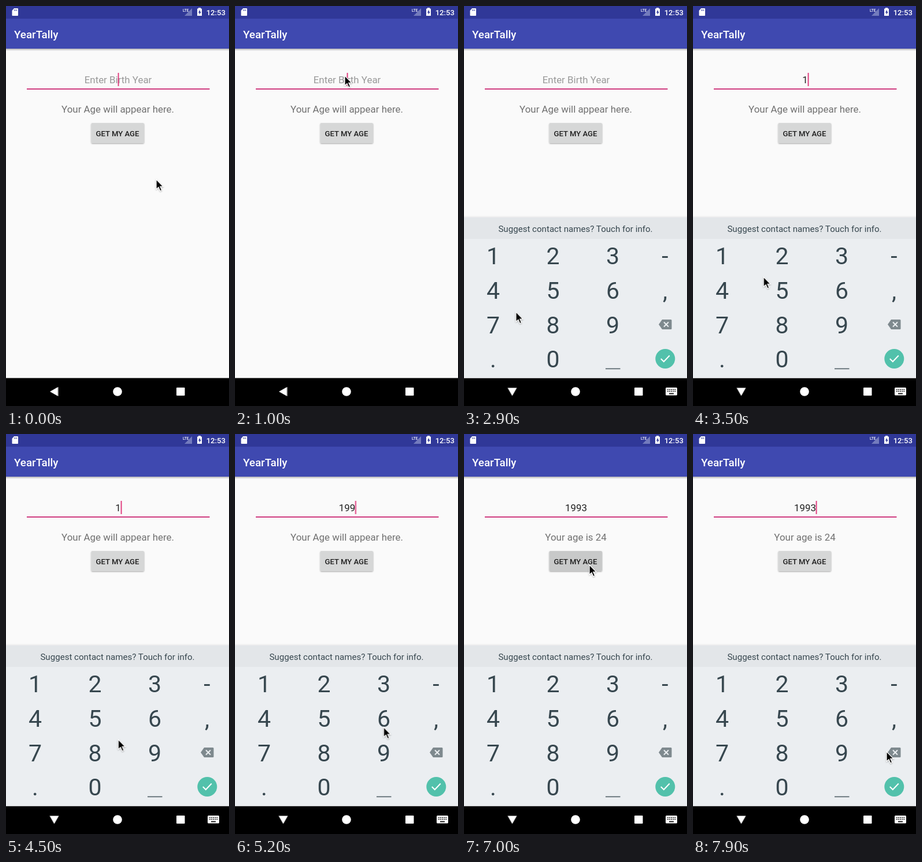
An HTML page that plays this animation: 386x694 px, repeating every 8000 ms.

```html
<!DOCTYPE html>
<html lang="en">
<head>
<meta charset="utf-8">
<title>Age finder</title>
<style>
html, body { margin: 0; width: 100%; height: 100%; overflow: hidden; background: #fafafa; }
svg { display: block; width: 386px; height: 694px; font-family: Roboto, sans-serif; }
.mid { text-anchor: middle; }
.bold { font-weight: 500; }
.body { font-size: 16.9px; }
.digits { font-size: 41px; fill: #37474f; }

#mouse, #board, #back, #ime, #lines, #caret, #caret rect, #ask, #answer, #press {
  animation: 8s linear infinite;
}
#ime, #lines, #caret, #caret rect, #ask, #answer { animation-timing-function: step-end; }
#mouse { animation-name: mouse; }
#board { animation-name: board; }
#back { animation-name: back; }
#ime { animation-name: ime; }
#lines { animation-name: lines; }
#caret { animation-name: caret; }
#caret rect { animation-name: blink; }
#ask { animation-name: ask; }
#answer { animation-name: answer; }
#press { animation-name: press; }

@keyframes mouse {
  0% { transform: translate(260px, 301px); }
  5% { transform: translate(282px, 240px); }
  11.25%, 15% { transform: translate(190px, 121px); }
  20%, 32.5% { transform: translate(206px, 125.5px); }
  36.25% { transform: translate(90px, 531px); }
  40%, 41.25% { transform: translate(57px, 440px); }
  43.75% { transform: translate(122px, 470px); }
  50%, 51.25% { transform: translate(200px, 500px); }
  56.25% { transform: translate(194px, 530px); }
  58.75%, 63.75% { transform: translate(258px, 545px); }
  67.5%, 71.25% { transform: translate(256px, 437px); }
  78.75%, 91.25% { transform: translate(217px, 227px); }
  98.75%, 100% { transform: translate(335px, 551px); }
}
@keyframes board {
  0%, 23.75% { transform: translateY(82px); opacity: 0; }
  27.5% { transform: translateY(27px); opacity: .72; }
  30.6%, 100% { transform: none; opacity: 1; }
}
@keyframes back {
  0%, 23.75% { transform: translate(83.5px, 669px) rotate(0deg); }
  26.25%, 100% { transform: translate(83.5px, 669px) rotate(-90deg); }
}
@keyframes ime { 0% { opacity: 0; } 25%, 100% { opacity: 1; } }
@keyframes lines {
  0% { transform: none; }
  42.5% { transform: translateY(-40px); }
  58.75% { transform: translateY(-80px); }
  61.25% { transform: translateY(-120px); }
  67.5%, 100% { transform: translateY(-160px); }
}
@keyframes caret {
  0% { transform: none; }
  42.5% { transform: translateX(5px); }
  58.75% { transform: translateX(9.5px); }
  61.25% { transform: translateX(14.3px); }
  67.5%, 100% { transform: translateX(19px); }
}
@keyframes blink {
  0%, 12.4%, 23.75%, 37.5%, 56.1%, 81.2%, 93.7%, 100% { opacity: 1; }
  6.25%, 18.75%, 31.25%, 50%, 75%, 87.5% { opacity: 0; }
}
@keyframes ask { 0% { opacity: 1; } 82%, 100% { opacity: 0; } }
@keyframes answer { 0% { opacity: 0; } 82%, 100% { opacity: 1; } }
@keyframes press {
  0%, 82%, 90%, 100% { opacity: 0; }
  83.75%, 87.5% { opacity: .06; }
}
</style>
</head>
<body>
<svg viewBox="0 0 386 694">
  <defs>
    <linearGradient id="fade" x2="0" y2="1">
      <stop stop-opacity=".28"/>
      <stop offset="1" stop-opacity="0"/>
    </linearGradient>
    <clipPath id="field"><rect x="36" y="110" width="317" height="32"/></clipPath>
    <filter id="soft" x="-50%" y="-50%" width="200%" height="200%">
      <feDropShadow dx="0" dy="1" stdDeviation="1" flood-opacity=".35"/>
    </filter>
  </defs>

  <rect width="386" height="694" fill="#fafafa"/>
  <rect y="74" width="386" height="4" fill="url(#fade)"/>
  <rect y="21" width="386" height="53" fill="#3f49b0"/>
  <rect width="386" height="22" fill="#303898"/>
  <text class="bold" x="14" y="55.500" font-size="18.800" fill="#fff">YearTally</text>

  <!-- status icons -->
  <path d="M14 4h6q1 0 1 1v11q0 1-1 1h-8.500q-1 0-1-1V8z" fill="#fff"/>
  <path d="M14.500 6v2.500M16.500 6v2.500M18.500 6v2.500" stroke="#303898" stroke-width=".9"/>
  <path d="M322 4v13h-13z" fill="#737bbd"/>
  <text class="bold" x="306" y="10" font-size="6.500" fill="#fff">LTE</text>
  <path d="M333 4.500V3h4v1.500h2V17h-8V4.500z" fill="#fff"/>
  <path d="M336 6.500l-3.200 5h1.900v3.500l3-5h-1.700z" fill="#303898"/>
  <text class="bold" x="380" y="15.500" text-anchor="end" font-size="13.150" fill="#fff">12:53</text>

  <!-- form -->
  <g clip-path="url(#field)">
    <g id="lines" class="mid body" fill="#212121">
      <text x="194" y="134" fill="#999">Enter Birth Year</text>
      <text x="194" y="174">1</text>
      <text x="194" y="214">19</text>
      <text x="194" y="254">199</text>
      <text x="194" y="294">1993</text>
    </g>
  </g>
  <rect x="36" y="143" width="316.500" height="2" fill="#cf3a7f"/>
  <g id="caret"><rect x="193.600" y="116" width="1.900" height="23" fill="#e0397c"/></g>
  <g class="mid body" fill="#707070">
    <text id="ask" x="193.500" y="184.700">Your Age will appear here.</text>
    <text id="answer" x="193.500" y="184.700">Your age is 24</text>
  </g>
  <rect x="147.500" y="203" width="91.500" height="35" rx="2" fill="#d6d7d7" filter="url(#soft)"/>
  <rect id="press" x="147.500" y="203" width="91.500" height="35" rx="2"/>
  <text class="mid bold" x="193" y="225.600" font-size="13.150" fill="#1f1f1f">GET MY AGE</text>

  <!-- navigation -->
  <rect y="645.500" width="386" height="48.500"/>
  <g fill="#fff">
    <path id="back" d="M-7.500 0L6.500-8V8z"/>
    <circle cx="193" cy="669" r="7.800"/>
    <rect x="295" y="662" width="14.500" height="14" rx="1"/>
    <g id="ime">
      <rect x="349" y="662" width="20" height="13.500" rx="1.500"/>
      <path d="M352 665.500h14.500M352 668.500h14.500" stroke="#000" stroke-width="1.700" stroke-dasharray="1.800 1.300"/>
      <path d="M355 672.500h8" stroke="#000" stroke-width="1.700"/>
    </g>
  </g>

  <!-- keyboard, sliding in over the navigation bar -->
  <g id="board">
    <rect y="364.500" width="386" height="3" fill="#000" opacity=".04"/>
    <rect y="366.500" width="386" height="38" fill="#e3e6e9"/>
    <rect y="404" width="386" height="241.500" fill="#ebeef1"/>
    <text class="mid" x="193" y="392" font-size="15.100" fill="#37474f">Suggest contact names? Touch for info.</text>
    <g class="mid digits">
      <text x="50.500" y="448.400">1</text><text x="154" y="448.400">2</text><text x="257.500" y="448.400">3</text><text x="348" y="448.400">-</text>
      <text x="50.500" y="508">4</text><text x="154" y="508">5</text><text x="257.500" y="508">6</text><text x="348" y="508">,</text>
      <text x="50.500" y="567.500">7</text><text x="154" y="567.500">8</text><text x="257.500" y="567.500">9</text>
      <text x="50.500" y="627">.</text><text x="154" y="627">0</text>
    </g>
    <rect x="245" y="628.500" width="25.500" height="1.700" fill="#59666d"/>
    <path d="M337 552.500l6-8.500h15q1.500 0 1.500 1.500v14q0 1.500-1.500 1.500h-15z" fill="#7e898e"/>
    <path d="M346 548.500l8 8m0-8l-8 8" stroke="#ebeef1" stroke-width="2"/>
    <circle cx="348.300" cy="612" r="17" fill="#52c1ab"/>
    <path d="M340.800 612l5 5 10-10.500" fill="none" stroke="#fff" stroke-width="2"/>
  </g>

  <g id="mouse">
    <path d="M0 0V17L4 13.500 6.800 20 9.600 18.800 6.800 12.400H12z" stroke="#fff" stroke-width="1.200" filter="url(#soft)"/>
  </g>
</svg>
</body>
</html>
```
